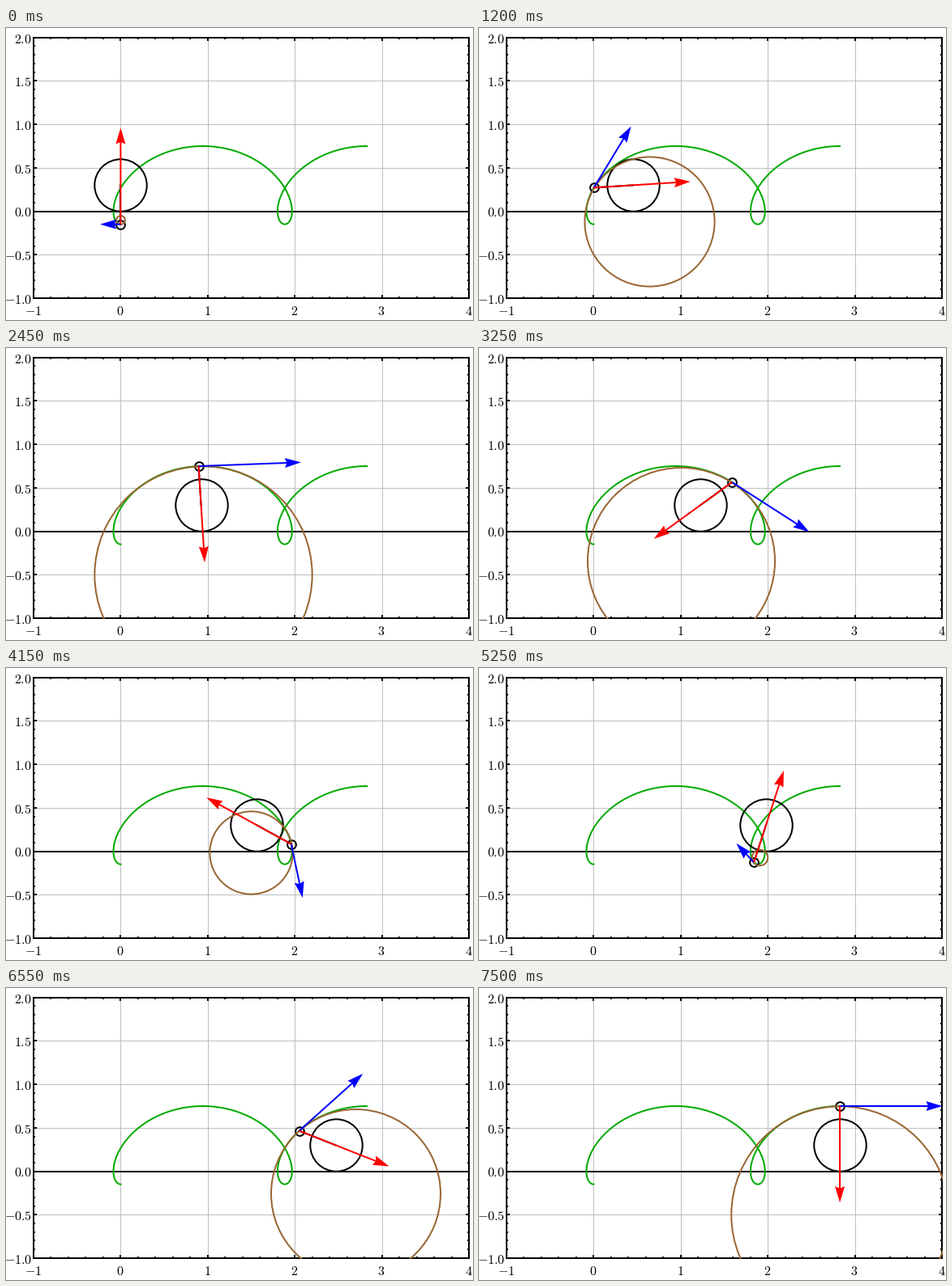
Animation, 576 px wide and 361 px high, one loop 7550 ms. Source, as a matplotlib script:

```python
import numpy as np
import matplotlib.pyplot as plt
from matplotlib.animation import FuncAnimation
from matplotlib.collections import PathCollection
from matplotlib.path import Path
from matplotlib.ticker import MultipleLocator
from matplotlib.transforms import IdentityTransform

plt.rcParams["mathtext.fontset"] = "cm"

W, H, DPI = 576, 361, 100
PX = 72 / DPI              # one pixel in points
LEFT, TOP, UNIT = 34, 11.75, 107.4
LINE = 2 * PX
R, D = 0.3, 0.45           # wheel radius, arm length
OMEGA = np.pi / 2
FRAMES, STEP = 151, 0.04
GREEN, BROWN = "#00aa00", "#996633"


def point(a):
    return np.array([R * a - D * np.sin(a), R - D * np.cos(a)])


def velocity(a):
    return OMEGA * np.array([R - D * np.cos(a), D * np.sin(a)])


def acceleration(a):
    return OMEGA**2 * D * np.array([np.sin(a), np.cos(a)])


fig = plt.figure(figsize=(W / 100, H / 100), dpi=DPI, facecolor="white")
width, height = 5 * UNIT, 3 * UNIT
ax = fig.add_axes([LEFT / W, 1 - (TOP + height) / H, width / W, height / H])
ax.set(xlim=(-1, 4), ylim=(-1, 2))
ax.set_axisbelow(True)

for axis, major, minor in ((ax.xaxis, 1, 0.2), (ax.yaxis, 0.5, 0.1)):
    axis.set_major_locator(MultipleLocator(major))
    axis.set_minor_locator(MultipleLocator(minor))
ax.grid(True, color="#b0b0b0", lw=1 * PX, alpha=0.8)
ticks = dict(direction="in", top=True, right=True, width=LINE,
             labelbottom=False, labelleft=False)
ax.tick_params(which="major", length=3, **ticks)
ax.tick_params(which="minor", length=1.5, **ticks)
for spine in ax.spines.values():
    spine.set_linewidth(LINE)

font = dict(fontsize=16 * PX, va="baseline")
for x in range(-1, 5):
    ax.text(x - 0.5 / UNIT, -1 - 21.5 / UNIT, f"${x}$", ha="center", **font)
for y in np.arange(-1, 2.1, 0.5):
    ax.text(-1 - 2 / UNIT, y - 6.9 / UNIT, f"${y:.1f}$", ha="right", **font)

ax.plot([-1, 4], [0, 0], color="black", lw=LINE, zorder=2)
ax.plot(*point(np.linspace(0, 3 * np.pi, 600)), color=GREEN, lw=LINE, zorder=3)


def disc(radius):
    return [Path.circle((0, 0), radius * UNIT)]


def ring(radius, color, z):
    """Outlined circle whose centre falls on whole pixels."""
    circle = PathCollection(disc(radius), offsets=[(0, 0)],
                            offset_transform=ax.transData,
                            transform=IdentityTransform(),
                            facecolors=[(1, 1, 1, 0)], edgecolors=[color],
                            linewidths=[LINE], zorder=z)
    return ax.add_collection(circle, autolim=False)


def arrow(color, z):
    return ax.quiver([0], [0], [1], [0], color=color, zorder=z,
                     angles="xy", scale_units="xy", scale=1,
                     units="dots", width=2, headwidth=6,
                     headlength=10, headaxislength=9)


def aim(arr, start, vec):
    arr.set_offsets([start])
    arr.set_UVC([vec[0]], [vec[1]])


wheel = ring(R, "black", 4)
pen = ring(0.05, "black", 4)
curvature = ring(1, BROWN, 5)
rod, = ax.plot([], [], color="black", lw=LINE, zorder=4)
blue, red = arrow("blue", 6), arrow("red", 7)


def update(k):
    a = OMEGA * STEP * k
    p, v, acc = point(a), velocity(a), acceleration(a)
    speed = np.hypot(*v)
    radius = speed**3 / abs(v[0] * acc[1] - v[1] * acc[0])
    normal = np.array([v[1], -v[0]]) / speed

    wheel.set_offsets([(R * a, R)])
    pen.set_offsets([p])
    curvature.set_offsets([p + radius * normal])
    curvature.set_paths(disc(radius))
    rod.set_data([R * a, p[0]], [R, p[1]])
    aim(blue, p, v)
    aim(red, p, acc)
    return wheel, pen, curvature, rod, blue, red


anim = FuncAnimation(fig, update, frames=FRAMES, interval=50,
                     repeat=True, repeat_delay=0, blit=False)
plt.show()
```
